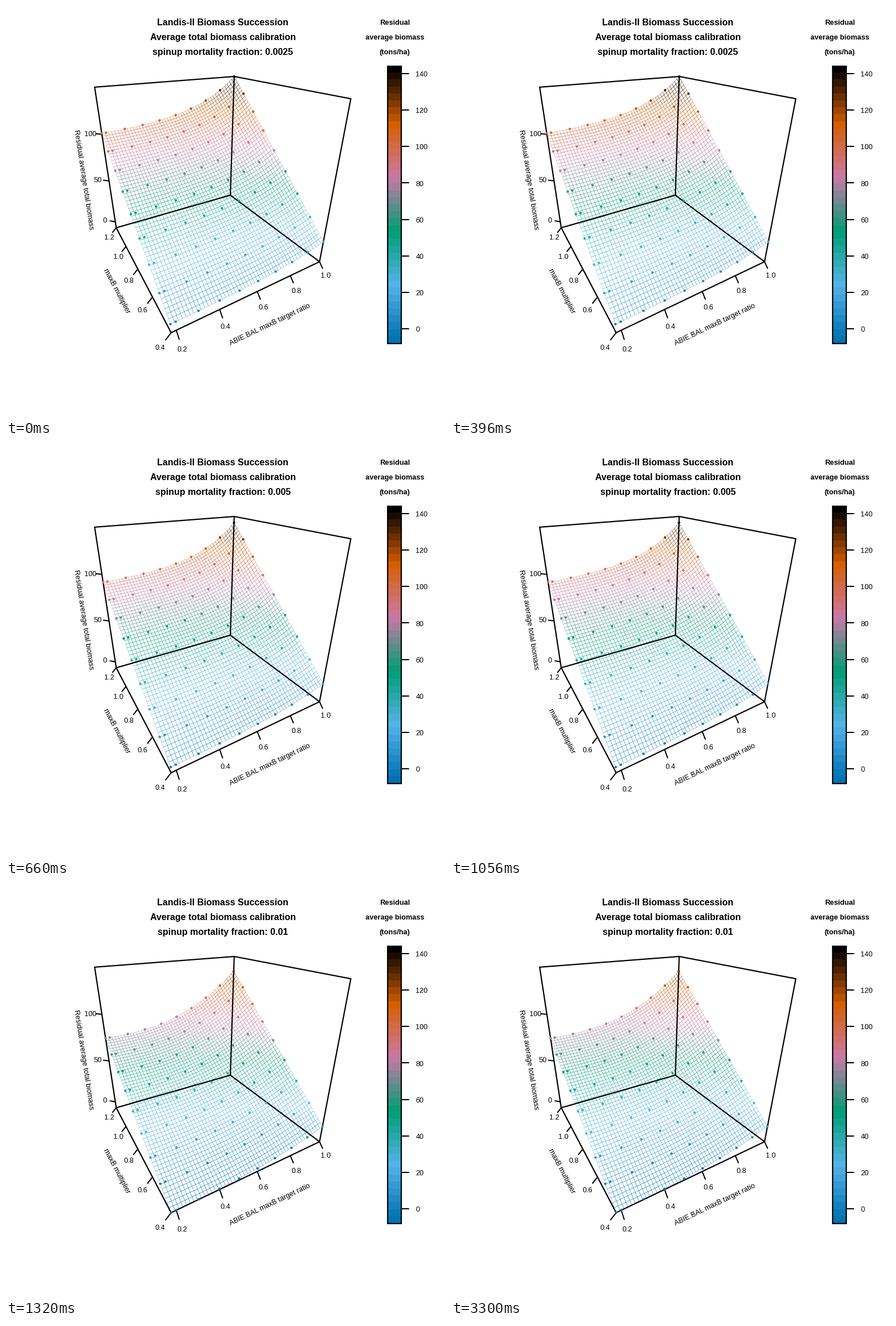
Write a matplotlib script that moves like this. It is 773 by 725 pixels and loops after 4.62 s.

```python
import numpy as np
import matplotlib.pyplot as plt
from matplotlib.animation import FuncAnimation
from matplotlib.collections import PolyCollection
from matplotlib.colors import LinearSegmentedColormap
from matplotlib.patches import Rectangle

WIDTH, HEIGHT, DPI = 773, 725, 128
PX = 72 / DPI                       # points per pixel
RATIO, MULTIPLIER, RESIDUAL = (0.178, 1.0), (0.4, 1.2), (-7.95, 144.2)
TARGET_BIOMASS = 49.3
BANDS = 40
MESH = 50
TICK = 0.03                         # tick length in box units

plt.rcParams["font.family"] = "Liberation Sans"
fig = plt.figure(figsize=(WIDTH / DPI, HEIGHT / DPI), dpi=DPI, facecolor="white")
ax = fig.add_axes([0, 0, 1, 1])

cmap = LinearSegmentedColormap.from_list(
    "residual", ["#0072B2", "#56B4E9", "#009E73", "#CC79A7", "#D55E00", "#000000"])
palette = cmap(np.linspace(0, 1, BANDS))


def band_colors(w):
    return palette[np.clip((w * BANDS).astype(int), 0, BANDS - 1)]


def unit(value, limits):
    return (value - limits[0]) / (limits[1] - limits[0])


# Corners of the unit box and where they fall on the stage.
CORNERS = {
    (0, 0, 0): (291, 575), (1, 0, 0): (552, 450),
    (1, 1, 0): (395, 333), (0, 1, 0): (194, 390),
    (1, 0, 1): (607, 163), (1, 1, 1): (402, 124), (0, 1, 1): (156, 143),
}


def solve_camera():
    rows, rhs = [], []
    for corner, (sx, sy) in CORNERS.items():
        p = np.array([*corner, 1.0])
        rows.append([*p, 0, 0, 0, 0, *(-sx * p[:3])])
        rows.append([0, 0, 0, 0, *p, *(-sy * p[:3])])
        rhs += [sx, sy]
    solution = np.linalg.lstsq(np.array(rows), np.array(rhs, float), rcond=None)[0]
    return np.append(solution, 1).reshape(3, 4)


camera = solve_camera()


def project(points):
    points = np.asarray(points, float)
    q = np.concatenate([points, np.ones_like(points[..., :1])], axis=-1) @ camera.T
    return q[..., :2] / q[..., 2:]


# Mortality fraction, then biomass per multiplier: base, rise, power, growth.
SCENES = [
    ("0.0025", 125.3, 35.9, 1.0, 1.95),
    ("0.005", 117.7, 37.9, 1.0, 2.1),
    ("0.01", 103.7, 44.0, 2.4, 0.0),
]


def surface(ratios, multipliers, base, rise, power, growth):
    x, y = np.meshgrid(ratios, multipliers)
    t = np.maximum(unit(x, (0.2, 1.0)), 0)
    biomass = y * (base + rise * t ** power * np.exp(growth * (t - 1)))
    w = unit(biomass - TARGET_BIOMASS, RESIDUAL)
    return project(np.stack([unit(x, RATIO), unit(y, MULTIPLIER), w], axis=-1)), w


def quads(a):
    return np.stack([a[:-1, :-1], a[:-1, 1:], a[1:, 1:], a[1:, :-1]], axis=2)


def build_scene(*shape):
    pts, w = surface(np.linspace(*RATIO, MESH), np.linspace(*MULTIPLIER, MESH), *shape)
    samples = np.append(RATIO[0], np.linspace(0.2, 1.0, 9))
    dots, dot_w = surface(samples, np.linspace(*MULTIPLIER, 9), *shape)
    return (quads(pts).reshape(-1, 4, 2), band_colors(quads(w).mean(axis=2).ravel()),
            dots.reshape(-1, 2), band_colors(dot_w.ravel()))


scenes = [(name, *build_scene(*shape)) for name, *shape in SCENES]


def line(points, width=2.2):
    xs, ys = zip(*points)
    ax.plot(xs, ys, color="black", lw=width * PX, zorder=2,
            solid_capstyle="round", solid_joinstyle="round")


def label(x, y, text, size=12.8, angle=0, ha="center", weight="normal"):
    """Text whose capitals are centred on (x, y)."""
    a, drop = np.radians(angle), 0.36 * size
    return ax.text(x + drop * np.sin(a), y + drop * np.cos(a), text,
                   fontsize=size * PX, rotation=angle, rotation_mode="anchor",
                   ha=ha, va="baseline", weight=weight, color="black")


def axis_tick(position, outward, text):
    """Tick from an edge of the box, with its text at twice the length."""
    start, outward = np.array(position), TICK * np.array(outward)
    line(project([start, start + outward]), width=2)
    label(*project(start + 2 * outward), text)


# Box
line(project([(0, 0, 0), (1, 0, 0), (1, 1, 0), (0, 1, 0), (0, 0, 0)]))
line(project([(0, 1, 0), (0, 1, 1), (1, 1, 1), (1, 0, 1), (1, 0, 0)]))
line(project([(1, 1, 0), (1, 1, 1)]))

# Axes
for value in (0.2, 0.4, 0.6, 0.8, 1.0):
    axis_tick((unit(value, RATIO), 0, 0), (0, -1, -1), f"{value}")
    axis_tick((0, unit(value + 0.2, MULTIPLIER), 0), (-1, 0, -1), f"{value + 0.2:.1f}")
for value in (0, 50, 100):
    axis_tick((0, 1, unit(value, RESIDUAL)), (-1, 1, 0), f"{value}")

label(138, 305.5, "Residual average total biomass", angle=-81.3)
label(196, 501.5, "maxB multiplier", angle=-62.3)
label(464.5, 559, "ABIE.BAL maxB target ratio", angle=25.6)

# Colour key
LEFT, RIGHT, TOP, BOTTOM = 672, 696, 105.5, 593.5
ax.imshow(palette[::-1, None], extent=(LEFT, RIGHT, BOTTOM, TOP),
          aspect="auto", interpolation="nearest")
ax.add_patch(Rectangle((LEFT, TOP), RIGHT - LEFT, BOTTOM - TOP, fill=False,
                       ec="black", lw=2.2 * PX, zorder=2))
for value in range(0, 141, 20):
    y = BOTTOM - (BOTTOM - TOP) * unit(value, RESIDUAL)
    line([(RIGHT, y), (RIGHT + 13, y)], width=2)
    label(721.5, y + 0.5, str(value), ha="left")

# Headings
KEY_TITLE = ("Residual", "average biomass", "(tons/ha)")
TITLE = ("Landis-II Biomass Succession", "Average total biomass calibration", "")
for i, (title, key_title) in enumerate(zip(TITLE, KEY_TITLE)):
    y = 28.5 + 25.8 * i
    heading = label(382, y, title, 16, weight="bold")
    label(684.5, y, key_title, weight="bold")

mesh = PolyCollection([], facecolors="none", linewidths=0.36 * PX, zorder=1)
ax.add_collection(mesh)
dots = ax.scatter([], [], s=(4.4 * PX) ** 2, linewidths=0, zorder=3)

ax.set_xlim(0, WIDTH)
ax.set_ylim(HEIGHT, 0)
ax.axis("off")


def update(step):
    name, cells, cell_colors, points, point_colors = scenes[min(step, 2)]
    mesh.set_verts(cells)
    mesh.set_edgecolor(cell_colors)
    dots.set_offsets(points)
    dots.set_facecolor(point_colors)
    heading.set_text(f"spinup mortality fraction: {name}")
    return mesh, dots, heading


update(0)
anim = FuncAnimation(fig, update, frames=7, interval=660, repeat=True, repeat_delay=0)
plt.show()
```
